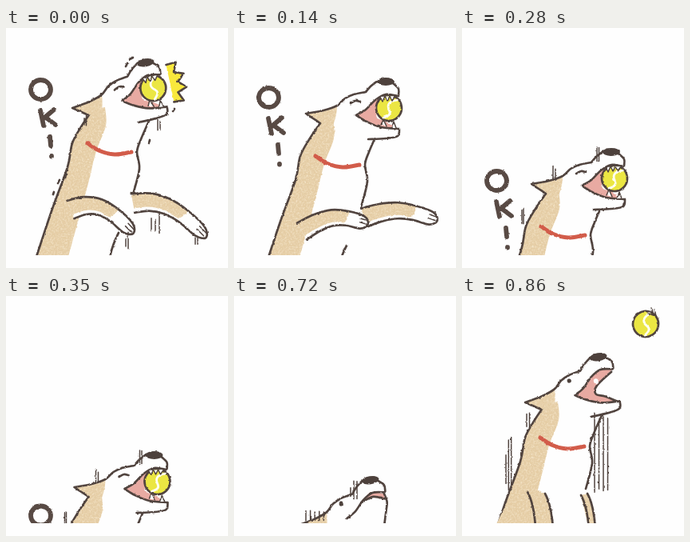
An HTML page that plays this animation: 278x300 px, repeating every 930 ms.

```html
<!DOCTYPE html>
<html lang="en">
<head>
<meta charset="utf-8">
<title>Dog catching a ball</title>
<style>
  html, body { margin: 0; width: 100%; height: 100%; overflow: hidden; background: #fefefe; }
  svg { display: block; width: 278px; height: 300px; }
  path, ellipse { fill: none; stroke-linecap: round; stroke-linejoin: round; }
  .ink { stroke: #51443f; stroke-width: 2.7; }
  .thin { stroke: #51443f; stroke-width: 1.5; }
  .dark { fill: #4d413c; }
  .tan { fill: #e5cda5; filter: url(#grain); }
  .white { fill: #fefefe; }
  .pink { fill: #e8aaa2; }
  .collar { stroke: #d25c4a; stroke-width: 5; }
  .burst { fill: #f9e83c; }
  .ball { fill: #ebe643; }
  .seam { stroke: #fffff2; stroke-width: 2.8; }
  .letter { stroke: #584a44; stroke-width: 5.8; }
</style>
</head>
<body>
<svg viewBox="0 0 278 300" role="img" aria-label="OK!">
  <defs>
    <clipPath id="floor"><path d="M0 0H278V284H0Z"/></clipPath>
    <filter id="rough" filterUnits="userSpaceOnUse" x="0" y="0" width="278" height="300" color-interpolation-filters="sRGB">
      <feTurbulence type="fractalNoise" baseFrequency=".25" numOctaves="2" seed="4"/>
      <feDisplacementMap in="SourceGraphic" scale="2.4" xChannelSelector="R" yChannelSelector="G"/>
    </filter>
    <filter id="grain" color-interpolation-filters="sRGB">
      <feTurbulence type="fractalNoise" baseFrequency=".45" numOctaves="2" seed="9"/>
      <feColorMatrix values="0 0 0 0 1  0 0 0 0 .96  0 0 0 0 .88  1.2 0 0 0 -.5"/>
      <feComposite in2="SourceGraphic" operator="in" result="specks"/>
      <feMerge><feMergeNode in="SourceGraphic"/><feMergeNode in="specks"/></feMerge>
    </filter>
  </defs>
  <g clip-path="url(#floor)"><g id="stage" filter="url(#rough)"></g></g>
</svg>
<script>
// Smooth curve through points; "/" marks a sharp corner.
function spline(text) {
  let d = '', last;
  for (const part of text.split('/')) {
    const n = part.trim().split(/[\s,]+/).map(Number);
    const p = last ? [last] : [];
    for (let i = 0; i < n.length; i += 2) p.push([n[i], n[i + 1]]);
    if (!last) d = 'M' + p[0];
    for (let i = 0; i < p.length - 1; i++) {
      const a = p[i], b = p[i + 1], before = p[i - 1] || a, after = p[i + 2] || b;
      const c1 = a.map((v, k) => v + (b[k] - before[k]) / 6);
      const c2 = b.map((v, k) => v - (after[k] - a[k]) / 6);
      d += `C${c1} ${c2} ${b}`;
    }
    last = p[p.length - 1];
  }
  return d;
}

const raw = (cls, d) => `<path class="${cls}" d="${d}"/>`;
const shape = (cls, line) => raw(cls, spline(line));
const dot = (cls, x, y, rx, ry = rx) => `<ellipse class="${cls}" cx="${x}" cy="${y}" rx="${rx}" ry="${ry}"/>`;
const group = (transform, art) => `<g transform="${transform}">${art}</g>`;
const move = (x, y, art) => group(`translate(${x} ${y})`, art);
const random = seed => Math.abs(Math.sin(seed * 12.9898) * 43758.5453) % 1;

// Vertical speed lines scattered over a box.
function streaks(x, y, w, h, count) {
  let d = '';
  for (let i = 0; i < count; i++) {
    const r = random(x + i);
    d += `M${x + w * i / count} ${y + h * .4 * r}v${h * (.95 - .55 * r)}`;
  }
  return raw('thin', d);
}

const lettering = y => move(0, y,
  dot('letter', 43.5, 0, 12.5, 12) +
  raw('letter', 'M43 26L47 45M60 25L46 37M50 35L62 44M55 59L56 70M57 83v.5'));

const ball = (x, y, turn) => group(`translate(${x} ${y}) rotate(${turn})`,
  dot('ball ink', 0, 0, 16) + raw('seam', 'M2-14C-6-6-4-1 2 2S5 9 2 14'));

function burst(x, y) {
  const spikes = [];
  for (let i = 0; i < 9; i++) {
    const angle = (i * 11.5 - 58) * Math.PI / 180, r = i % 2 ? 43 : 33;
    spikes.push([x + r * Math.cos(angle), y + r * Math.sin(angle)]);
  }
  const outer = 'M' + spikes.join('L');
  return raw('burst', outer) + raw('ink', outer) + dot('white', x, y, 23);
}

// Tapered limb along a bent centre line: tan above, white below and at the paw.
function arm(x, y, length, lift, drop) {
  const at = (u, side) => {
    const slope = 2 * drop * u - lift * Math.PI * Math.cos(Math.PI * u);
    const w = side * (12 - 4 * u) / Math.hypot(length, slope);
    return [x + length * u - slope * w, y - lift * Math.sin(Math.PI * u) + drop * u * u + length * w];
  };
  const edge = (side, end = 1) => [0, .25, .5, .75, 1].map(u => at(u * end, side));
  const line = points => points.join(' ');
  const outline = line([...edge(-1), at(1.09, 0), ...edge(1).reverse()]);
  const fur = line(edge(-1, .76)) + ' / ' + line(edge(.55, .72).reverse());
  const toes = [.1, -.5].map(s => 'M' + at(1.06, s) + 'L' + at(.96, s)).join('');
  return shape('white', outline) + shape('tan', fur) + shape('ink', outline) + raw('thin', toes);
}

const arms = hang =>
  arm(163 - 4 * hang, 237 - 2 * hang, 84, 9 - 4 * hang, 1 + 34 * hang) +
  raw('ink', 'M141 272Q134 285 130 302') +
  arm(85 - 4 * hang, 254 - 11 * hang, 76 - 4 * hang, 14 - 5 * hang, 34 * hang - 11);

function legs() {
  const leg = 'q8 14 10 44';
  return raw('tan', `M74 214L108 230${leg}H44Z`) + raw('tan', `M161 230${leg}h-8L153 232Z`) +
    raw('ink', [[86, 228], [108, 230], [153, 232], [161, 230]].map(p => 'M' + p + leg).join(''));
}

const body = () => {
  const back = '108 119 95 138 83 160 77 190 58 242 38 302';
  return shape('tan', back + ' / 78 302 / 95 240 104 206 113 170 125 138 124 115 / 108 119') +
    shape('ink', back) + shape('ink', '180 130 169 155 164 171 167 192 159 224') +
    shape('collar', '102 160 116 169 136 174 157 171');
};

function head({ open, held, turn }) {
  const ear = '108 119 99 113 90 107 / 112 103 129 97';
  const lip = '205 85 190 83 177 90 165 102 153 109';
  const jaw = lip => `${lip} / 166 117 184 124 207 126 / 205 135 190 138 168 139`;
  const mouth = open
    ? shape('white', jaw('153 109')) +
      shape('pink', lip + ' / 166 117 184 124 204 126 / 190 117 179 112 182 102 205 85') +
      (held ? '' : shape('ink', '203 88 182 102 179 112 190 117 204 126') + dot('white', 182, 96, 3)) +
      shape('ink', jaw(lip))
    : shape('pink', '204 87 188 82 176 91 / 190 88 204 92') + shape('ink', lip) +
      shape('ink', '176 92 190 88 204 93') + shape('ink', '204 86 206 97 203 108 197 127');
  const bite = raw('white thin', 'M183 86l3 6 3-7 3 6 3-6 3 6 4-6M184 121l3-7 4 9M197 125l3-8 3 8');
  return shape('tan', ear + ' / 128 108 124 122 / 108 119') +
    shape('ink', ear + ' 139 88 150 83 165 80 / 171 73 180 66') + shape('ink', '199 69 206 76 206 84') +
    mouth + dot('dark', 190, 67, 11, 5) +
    (held ? shape('ink', '146 94 152 91 158 92') + ball(194, 100, turn) + bite : dot('dark', 149, 90, 2.6));
}

// tilt swings the head back around the neck.
const dog = (x, y, tilt, limbs, face, lines) =>
  move(x, y, body() + limbs + group(`rotate(${-10 * tilt} 138 151)`, head(face)) + lines);

function catching(step) {
  const rear = Math.max(0, 1 - step / 2), fall = Math.max(0, step - 2);
  const lines = fall
    ? streaks(117, 84, 6, 18, 2) + streaks(78, 138, 4, 20, 2) + streaks(172, 60, 5, 20, 2)
    : '';
  const shock = streaks(150, 255, 6, 22, 2) + streaks(237, 259, 6, 13, 2) + streaks(182, 230, 15, 28, 3) +
    streaks(98, 106, 5, 18, 2) + streaks(190, 110, 6, 20, 2) +
    raw('ink', 'M159 37l-4 2M152 44l-2 4M76 183l-2 4M67 190l-2 4M60 205l-1 3M211 101l-2 3M180 140l-1 4');
  return lettering(87 - 10 * rear + 31 * fall + 10.5 * fall * fall) +
    (step ? '' : burst(183, 74)) +
    dog(-1.5 * fall, 44 * fall - 16 * rear, rear, arms(fall ? 1 : rear),
      { open: true, held: true, turn: 38 - 28 * rear }, lines) +
    (step ? '' : shock);
}

function leaping(step) {
  const lines = step
    ? streaks(59, 158, 10, 72, 3) + streaks(85, 124, 7, 26, 2) + streaks(170, 128, 22, 106, 4)
    : streaks(94, 90, 28, 24, 5) + streaks(150, 60, 12, 24, 3);
  return dog(-4, 17 + 77 * (2 - step), 1, legs(), { open: step > 0 }, lines) +
    (step === 2 ? ball(230, 35, 12) + raw('thin', 'M237 15l3 8M241 17l2 8M234 22l8 3') : '');
}

const stage = document.getElementById('stage');
const STEP = 70;
function picture(t) {
  if (t < 420) return catching(Math.floor(t / STEP));
  return t < 720 ? '' : leaping(Math.floor((t - 720) / STEP));
}

let shown;
function draw() {
  const t = performance.now() % 930;
  const step = Math.floor((t < 420 ? t : Math.max(420, t - 230)) / STEP);
  if (step !== shown) stage.innerHTML = picture(t);
  shown = step;
  requestAnimationFrame(draw);
}
draw();
</script>
</body>
</html>
```
